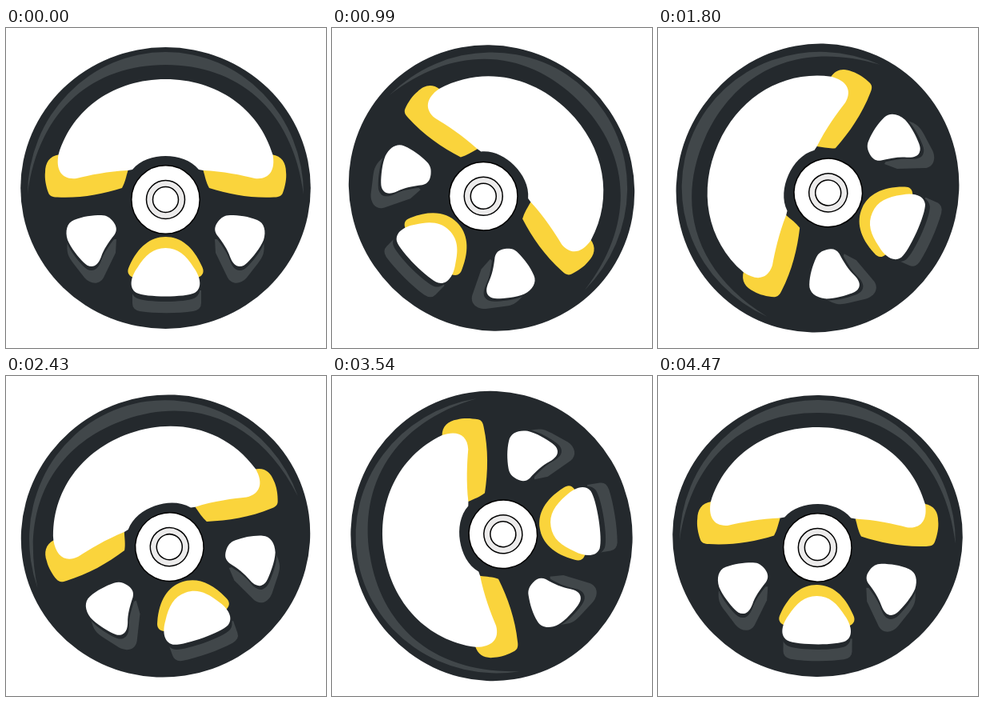
Recreate the animation shown at these times as an HTML page. Size 400 by 400 pixels, loop 4500 ms.

```html
<!DOCTYPE html>
<html lang="en">
<head>
<meta charset="utf-8">
<title>Steering wheel</title>
<style>
  html, body { margin: 0; width: 100%; height: 100%; overflow: hidden; background: #fff; }
  svg { display: block; width: 100%; height: 100%; }
  .dark { fill: #24292d; }
  .shade { fill: #41474a; }
  .grip { fill: #fad43c; }
  .hole { fill: #fff; }
  .line { stroke: #000; stroke-width: 1.5; }
</style>
</head>
<body>
<svg viewBox="0 0 400 400">
  <defs>
    <path id="side" d="M85 240C96 235.500 108 234 119 234C126 234 130 237 134 242C138.500 248 139 253 135.500 258.500C128 268 122 277 119 286C116 294 112 298 107 298C103 298 100 296 97 293C91 287 81 275 77 265C73.500 254 76 243.500 85 240Z"/>
    <path id="low" d="M199.500 275C215 275 225 284 235 300C243 311 246 325 236 331C224 337 175 337 163 331C153 325 156 311 164 300C174 284 184 275 199.500 275Z"/>
    <g id="half">
      <path class="shade" d="M77 266C75 281 78 286 84 294L98 312C106 321 117 321 122 312L137 281L138 264Z"/>
      <use href="#side" class="dark" y="5"/>
      <use href="#side" class="hole"/>
      <path class="grip" d="M66.500 158.300C54 160 49 169 49 180C48 188 50 198 53 206C54.500 210 58 211.500 64 211.500C92 213 120 208 145 200C149 193 150 186 152.500 178C128 170 104 176 90 178C80 180 70 172 66.500 158.300Z"/>
    </g>
  </defs>
  <g id="wheel">
    <ellipse class="dark" cx="199.500" cy="200" rx="181.300" ry="176"/>
    <path class="shade" d="M27 208A172.500 178 0 0 1 372 208C358 100 288 46 199.500 46C111 46 41 100 27 208Z"/>
    <use href="#half"/>
    <use href="#half" transform="matrix(-1 0 0 1 399 0)"/>
    <path class="hole" d="M65.500 158.500C83 100 136 64 199.500 64C263 64 316 100 333.500 158.500C337 178 329 190 311 188C295 184 271 179 246.500 178L241 177C231 165 215 160 199.500 160C184 160 168 165 158 177L152.500 178C128 179 104 184 88 188C70 190 62 178 65.500 158.500Z"/>
    <path class="shade" d="M158 328V344Q158 352 167 354C186 357 215 357 234 354Q244 352 244 344V328Z"/>
    <use href="#low" class="dark" y="6.500"/>
    <path class="grip" d="M159 312C152 309 151 304 154 298C165 273 181 261 199.500 261C218 261 234 273 245 298C248 304 247 309 240 312Z"/>
    <use href="#low" class="hole"/>
    <circle class="hole line" cx="199.500" cy="214.500" r="42.700"/>
    <circle class="line" cx="199.500" cy="214.500" r="24" fill="#ecebeb"/>
    <circle class="hole line" cx="199.500" cy="214.500" r="16"/>
  </g>
</svg>
<script>
const LOOP = 4500;
const wheel = document.getElementById('wheel');

// [time in ms, angle in degrees]
const keys = [
  [0, 0], [540, 47], [740, 64], [990, 45], [1350, 0], [1620, -46], [1880, -69],
  [2160, -46], [2430, -19.5], [2640, -5], [3600, -100], [4470, 0.6], [LOOP, 0]
];

// Tangents are flat at turning points, so the swing never overshoots.
function slope(i) {
  if (i === 0 || i === keys.length - 1) return 0;
  const [t0, a0] = keys[i - 1], [t1, a1] = keys[i], [t2, a2] = keys[i + 1];
  const before = (a1 - a0) / (t1 - t0), after = (a2 - a1) / (t2 - t1);
  return before * after <= 0 ? 0 : 2 * before * after / (before + after);
}

function angleAt(t) {
  let i = 0;
  while (t >= keys[i + 1][0]) i++;
  const [t0, a0] = keys[i], [t1, a1] = keys[i + 1];
  const d = t1 - t0, u = (t - t0) / d, v = 1 - u;
  return a0 * v * v * (1 + 2 * u) + a1 * u * u * (3 - 2 * u)
    + d * u * v * (slope(i) * v - slope(i + 1) * u);
}

function draw(t) {
  wheel.setAttribute('transform', `rotate(${angleAt(t).toFixed(3)} 199.5 200)`);
}

const start = performance.now();
function tick() {
  draw((performance.now() - start) % LOOP);
  requestAnimationFrame(tick);
}
tick();
</script>
</body>
</html>
```
